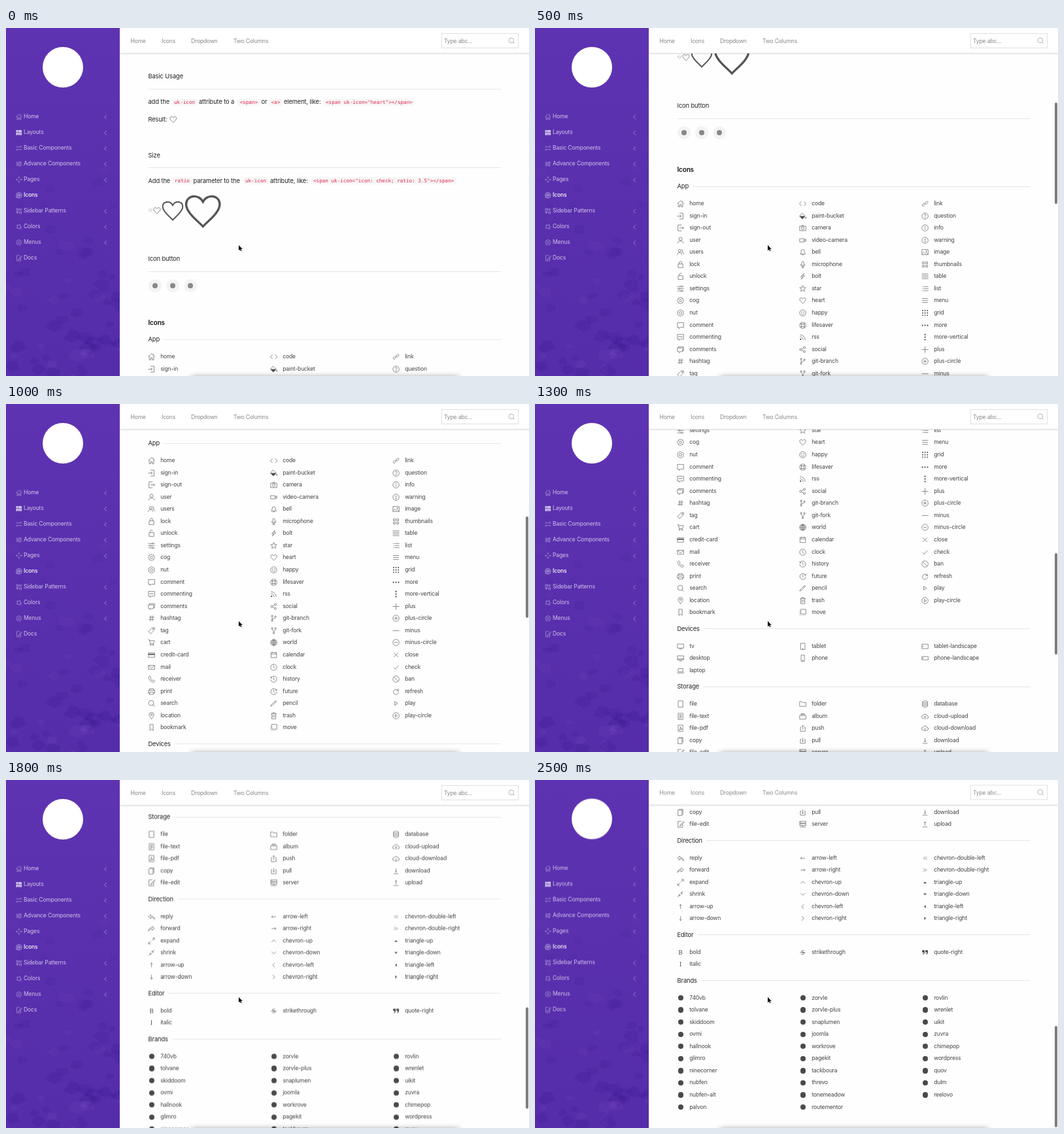
Write an HTML page that moves like this. It is 800x532 px and loops after 2.6 s.

```html
<!DOCTYPE html>
<html lang="en">
<head>
<meta charset="utf-8">
<title>Icons</title>
<style>
html, body { margin: 0; width: 100%; height: 100%; overflow: hidden; background: #fefefe; }
#stage { position: relative; width: 800px; height: 532px; overflow: hidden; background: #fefefe;
  font: 8.6px/12px Inter, "Liberation Sans", sans-serif; letter-spacing: -.02em; }
#stage div, #stage span, #stage svg { position: absolute; }
#page { inset: 0 0 -2px 0; }
#view { left: 0; top: 38px; width: 800px; height: 496px; overflow: hidden; }
#content { left: 0; top: -38px; width: 800px; height: 1600px; color: #444; }
#head { left: 174px; top: -2px; width: 626px; height: 39.5px; background: #fff; border-bottom: 1px solid #e2e2e2;
  box-shadow: 0 1px 2px rgba(0,0,0,.1); }
#side { left: 0; top: 0; width: 174px; height: 534px; overflow: hidden; background: linear-gradient(#5e33b2, #552ca9); }
#box { left: 666px; top: 8px; width: 116px; height: 21px; border: 1px solid #dfdfdf; background: #fff; }
#logo { left: 56px; top: 29px; width: 62px; height: 62px; border-radius: 50%; background: #fff; }
#thumb { left: 795px; top: 0; width: 4px; height: 155px; border-radius: 2px; background: #7d7d7d; }
#dock { left: 282px; top: 534px; width: 412px; height: 20px; border-radius: 6px; box-shadow: 0 0 9px 1px rgba(0,0,0,.4); }
.t { white-space: pre; margin-top: -6px; }
.nav { color: #888; }
.menu { color: #d0c2ea; }
.on { color: #fff; font-weight: 500; }
.p, .h { font-size: 9.4px; letter-spacing: -.015em; color: #222; }
.big { font-size: 10px; font-weight: 600; color: #111; }
.code { font: 7.62px/11px "DejaVu Sans Mono", monospace; letter-spacing: 0; color: #e3264f; background: #f7f6f6;
  padding: 0 3.3px; margin: -5.2px 0 0 -3.3px; border-radius: 1px; }
.rule { height: 1px; background: #e5e5e5; }
.h { left: 217.5px; width: 539px; display: flex; align-items: center; }
.h::after { content: ""; flex: 1; height: 1px; margin-left: 6px; background: #e5e5e5; }
.dot { border-radius: 50%; }
svg { overflow: visible; fill: none; stroke: currentColor; stroke-width: 1.1; }
svg .f { fill: currentColor; stroke: none; }
svg text { fill: currentColor; stroke: none; font: 17px "Liberation Serif", serif; text-anchor: middle; }
</style>
</head>
<body>
<div id="stage">
  <div id="page">
    <div id="view"><div id="content"></div></div>
    <div id="head"></div>
    <div id="top"><div id="box"></div></div>
    <div id="side"><svg id="rocks" width="174" height="534"></svg><div id="logo"></div></div>
  </div>
  <div id="thumb"></div>
  <div id="dock"></div>
  <svg style="left:356px;top:332px;stroke:none" width="8" height="11">
    <path d="M0 0v8.2l1.9-1.8 1.3 2.9 1.2-.6-1.2-2.8h2.6z" fill="#000" stroke="#fff" stroke-width=".7" paint-order="stroke"/>
  </svg>
</div>
<script>
const $ = id => document.getElementById(id);

// path helpers on a 20 x 20 grid
const c = (x, y, r) => `M${x - r} ${y}a${r} ${r} 0 1 0 ${2 * r} 0a${r} ${r} 0 1 0 ${-2 * r} 0`;
const b = (x, y, w, h) => `M${x} ${y}h${w}v${h}h${-w}z`;
const poly = (n, out, inn, turn = 0) => 'M' + Array.from({ length: 2 * n }, (_, i) => {
  const a = Math.PI * i / n - Math.PI / 2 + turn, r = i % 2 ? inn : out;
  return (10 + r * Math.cos(a)).toFixed(2) + ' ' + (10 + r * Math.sin(a)).toFixed(2);
}).join('L') + 'z';
const ring = c(10, 10, 8.5);
const dots = (...list) => '|' + list.map(([x, y]) => c(x, y, 1.3)).join('');
const cloud = 'M6.5 15.5H5a4 4 0 0 1-.5-8 6 6 0 0 1 11.3 1 3.5 3.5 0 0 1-.3 7h-2';
const sheet = b(3.5, 1.5, 13, 17);
const bubble = 'M6 18.7V15.5H1.5v-13h17v13H9.5z';

// stroke path | fill path, or =letter
const ICONS = {
  home: 'M1 10L10 1.5 19 10M4 8v10.500h4v-6h4v6h4V8M15 2v3',
  'sign-in': 'M7 2h10v16H7M1 10h11M8.5 6.5L12 10l-3.5 3.5',
  'sign-out': 'M13 2H3v16h10M7 10h11M15 6.5L18.5 10 15 13.5',
  user: c(10, 6, 4.4) + 'M2 18.5c0-4 3-6.5 8-6.5s8 2.5 8 6.5',
  users: c(7.5, 6.5, 3.5) + 'M1 17.5c0-4 2.5-6 6.5-6s6.5 2 6.5 6M11.5 3.5a3.4 3.4 0 1 1 2 6.5c3.5.3 5.5 2.5 5.5 5.5',
  lock: b(3.5, 8.5, 13, 10) + 'M6.5 8V5a3.5 3.5 0 0 1 7 0v3',
  unlock: b(3.5, 8.5, 13, 10) + 'M6.5 8V5a3.5 3.5 0 0 1 6.8-1.2',
  settings: 'M1 4h10M15 4h4M1 10h4M9 10h10M1 16h10M15 16h4' + c(13, 4, 2) + c(7, 10, 2) + c(13, 16, 2),
  cog: c(10, 10, 3.2) + poly(8, 9, 7.4),
  nut: c(10, 10, 3.5) + poly(3, 9, 9),
  comment: bubble,
  commenting: bubble + dots([6, 9], [10, 9], [14, 9]),
  comments: 'M6.5 19v-3.5H1.5v-10h14v10H9.8zM4 5.5v-3h14.5V13h-3',
  hashtag: 'M3.5 7h14M2.5 13h14M8.5 2.5L6 17.5M14 2.5L11.5 17.5',
  tag: 'M18.5 1.5l-.6 6L7.5 18.5l-6-6L12 2z' + c(14.5, 5.5, 1.2),
  cart: 'M1 2h2.6l3 11h8.6l3-8H4.6' + c(7.5, 16.5, 1.7) + c(14.5, 16.5, 1.7),
  'credit-card': b(1.5, 4.5, 17, 12) + '|' + b(1.5, 7, 17, 3),
  mail: b(1.5, 4.5, 17, 11) + 'M1.5 5.5l8.5 6.500 8.5-6.500',
  receiver: 'M6 1.5c-3 1-5 2.5-4 5.5 2 6 6 10 12 11.5 2.5.5 4-1.5 4.5-3.5l-4-3-2.5 2c-2.5-1-4-3-5-5l2-2z',
  print: 'M4.5 7V2.5h11V7M4.5 14.5h-3v-8h17v8h-3' + b(4.5, 11.5, 11, 6),
  search: c(9, 9, 7) + 'M14 14l4.5 4.5',
  location: 'M10 19C6 13 3.5 10 3.5 7.2a6.5 6.3 0 0 1 13 0C16.5 10 14 13 10 19z' + c(10, 7, 2.3),
  bookmark: 'M5.5 1.5h9v17L10 14l-4.5 4.5z',
  code: 'M6 4L1 10l5 6M14 4l5 6-5 6',
  'paint-bucket': 'M8 1.5l9 9L9 18l-8-7.5z|M1 10h16l-8 8zM18.5 12c-1.500 2-2 3.500-.8 4.500 1 .7 2.200 0 2.200-1.200 0-1-.8-2-1.400-3.300z',
  camera: b(1.5, 5.5, 17, 12) + 'M7 5.500l1-2.500h4l1 2.500' + c(10, 11, 3.7),
  'video-camera': b(1.5, 5.5, 12, 9) + 'M13.5 9l5-2.500v7l-5-2.500',
  bell: 'M3 15.5c2-2 2.5-4 2.5-7a4.5 5.500 0 0 1 9 0c0 3 .5 5 2.5 7zM8 16a2 2 0 0 0 4 0',
  microphone: 'M7 5a3 3 0 0 1 6 0v5a3 3 0 0 1-6 0zM4.5 9v1.5a5.5 5 0 0 0 11 0V9M10 15.500v3M6.500 18.500h7',
  bolt: 'M13 2L4.5 11h5L6 18l9.500-9.500h-5.200z',
  star: poly(5, 9, 4),
  heart: 'M10 18C7.8 15.5 1.5 11 1.5 6.8 1.5 2.2 7.6 1.2 10 5.5c2.4-4.3 8.5-3.3 8.5 1.3C18.5 11 12.200 15.500 10 18z',
  happy: ring + 'M5.500 12q4.500 5 9 0' + dots([7, 7.5], [13, 7.5]),
  lifesaver: ring + c(10, 10, 4.2) + 'M3 5l4 3M5 3l3 4M17 5l-4 3M15 3l-3 4M3 15l4-3M5 17l3-4M17 15l-4-3M15 17l-3-4',
  rss: 'M2 3.500A14.500 14.500 0 0 1 16.500 18M2 9a9 9 0 0 1 9 9|' + c(4, 16, 2),
  social: c(4, 10, 2.7) + c(14.5, 4.5, 2.7) + c(14.5, 15.5, 2.7) + 'M6.500 8.700l5.500-3M6.500 11.300l5.500 3',
  'git-branch': c(5.5, 3.5, 2) + c(5.5, 16.5, 2) + c(14.5, 5.5, 2) + 'M5.500 5.500v9M14.500 7.500c0 4-9 2-9 6.500',
  'git-fork': c(5.5, 3.5, 2) + c(14.5, 3.5, 2) + c(10, 16.5, 2) + 'M5.500 5.500c0 5 4.500 3 4.500 9 0-6 4.500-4 4.500-9',
  world: ring + 'M1.500 10h17M10 1.500v17M10 1.500c-5.500 5-5.500 12 0 17 5.500-5 5.500-12 0-17M3 5.500h14M3 14.500h14',
  calendar: b(2.5, 3.5, 15, 14) + 'M2.500 7.500h15M6 2v3M14 2v3',
  clock: ring + 'M10 4.500v6l3.500 3.500',
  history: 'M2 3v4h4M2.300 7a8.200 8.200 0 1 1-.6 4M10 5v5.500l3 3',
  future: 'M18 3v4h-4M17.700 7a8.200 8.200 0 1 0 .6 4M10 5v5.500l3 3',
  pencil: 'M17.500 4.500L6 16l-4.500 2 2-4.500L15.500 2.500zM13 5l2 2',
  trash: 'M2.500 4h15M7.500 4V1.500h5V4M4.500 4v14.500h11V4M8 7v8M12 7v8',
  move: b(4.5, 1.5, 14, 13) + 'M1.500 5v1.500M1.500 9v1.500M1.500 13v1.500M1.500 18h1.500M6 18h1.500M10 18h1.500M14 18h1.500',
  link: 'M10.500 7l3-3a2.400 2.400 0 0 1 3.500 3.500L13.500 11a2.400 2.400 0 0 1-3.400 0M9.500 13l-3 3A2.400 2.400 0 0 1 3 12.500L6.500 9a2.400 2.400 0 0 1 3.400 0M7.500 12.500l5-5',
  question: ring + 'M7.500 7.500a2.500 2.500 0 1 1 3.500 2.300q-1 .5-1 2' + dots([10, 14.5]),
  info: ring + 'M10 9v5.500' + dots([10, 6]),
  warning: ring + 'M10 5v6.500' + dots([10, 14]),
  image: b(1.5, 3, 17, 14) + 'M1.500 15l5-5 4 4 3-2.500 5 4' + c(13.5, 7.5, 1.3),
  thumbnails: b(3, 3, 5, 5) + b(12, 3, 5, 5) + b(3, 12, 5, 5) + b(12, 12, 5, 5),
  table: 'M1 3.500h18M1 7.800h18M1 12.100h18M1 16.500h18',
  list: 'M6 4.500h13M6 10h13M6 15.500h13M2 4.500h2M2 10h2M2 15.500h2',
  menu: 'M2 4.500h16M2 10h16M2 15.500h16',
  grid: '|' + [2, 8.5, 15].map(x => [2, 8.5, 15].map(y => b(x, y, 3, 3)).join('')).join(''),
  more: '|' + [3, 10, 17].map(x => c(x, 10, 2)).join(''),
  'more-vertical': '|' + [3, 10, 17].map(y => c(10, y, 2)).join(''),
  plus: 'M10 1v18M1 10h18',
  'plus-circle': ring + 'M10 5.500v9M5.500 10h9',
  minus: 'M1 10h18',
  'minus-circle': ring + 'M5.500 10h9',
  close: 'M4 4l12 12M16 4L4 16',
  check: 'M4 10.500l4 4.500 9-10',
  ban: ring + 'M4 4l12 12',
  refresh: 'M16 7.500A7 7 0 1 0 17 11.500M16.500 2.500v5.500h-5',
  play: 'M6.500 5l8 5-8 5z',
  'play-circle': ring + 'M8 6.500l5.500 3.500L8 13.500z',
  tv: b(1.5, 3.5, 17, 11) + 'M6 17h8',
  desktop: b(1.5, 3.5, 17, 11) + 'M6 17.500h8M1.500 12h17',
  laptop: b(3.5, 4.5, 13, 9) + 'M0 16.500h20',
  tablet: b(4, 1.5, 12, 17) + dots([10, 16]),
  phone: b(5.5, 1.5, 9, 17) + dots([10, 16]),
  'tablet-landscape': b(1.5, 4, 17, 12) + dots([4, 10]),
  'phone-landscape': b(1.5, 5.5, 17, 9) + dots([4, 10]),
  file: sheet,
  'file-text': sheet + 'M6.500 6h7M6.500 9h7M6.500 12h7M6.500 15h4',
  'file-pdf': sheet + 'M6 15c4-4 5-8 3.500-9-1.500 1 2 6 5 6.500-2 0-6 1-8.500 2.500',
  copy: b(3, 3.5, 11, 15) + 'M5.500 1.500h11v15',
  'file-edit': 'M12 2H3v16.500h13V10M18.500 2.500L9.500 11.500 8 15l3.500-1.500L19.500 4.500z',
  folder: 'M1.500 16.500v-13h6l2 2.500h9v10.500z',
  album: b(1.5, 7.5, 17, 10) + 'M3 5h14M5 2.500h10',
  push: 'M6 7.500H3.500v11h13v-11H14M10 14V2M7 5l3-3 3 3',
  pull: 'M6 6.500H3.500v11h13v-11H14M10 2v11M7 10l3 3 3-3',
  server: b(1.5, 2, 17, 5) + b(1.5, 8.5, 17, 5) + 'M10 13.500v4M2 17.500h16M4 4.500h2M4 11h2',
  database: 'M3 4a7 2.500 0 1 0 14 0a7 2.500 0 1 0-14 0v12a7 2.500 0 0 0 14 0V4M3 8a7 2.500 0 0 0 14 0M3 12a7 2.500 0 0 0 14 0',
  'cloud-upload': cloud + 'M10 18V9.500M7.500 12l2.500-2.500 2.500 2.500',
  'cloud-download': cloud + 'M10 9v9M7.500 15.500L10 18l2.500-2.500',
  download: 'M10 3v10M7 10.500l3 3 3-3M3.500 17.500h13',
  upload: 'M10 14V3.500M7 6.500l3-3 3 3M3.500 17.500h13',
  reply: 'M8 4L1.500 9.500 8 15v-3.500c5 0 8 1.500 10.500 5.500-1-6-4-9-10.500-9.500z',
  forward: 'M12 4l6.500 5.500L12 15v-3.500c-5 0-8 1.500-10.500 5.500 1-6 4-9 10.500-9.500z',
  expand: 'M12.500 2H18v5.500M18 2l-7 7M7.500 18H2v-5.500M2 18l7-7',
  shrink: 'M11.500 4v4.500H16M11.500 8.500L18 2M8.500 16v-4.500H4M8.500 11.500L2 18',
  'arrow-up': 'M10 4v12M6.500 7.500L10 4l3.500 3.500',
  'arrow-down': 'M10 4v12M6.500 12.500L10 16l3.500-3.500',
  'arrow-left': 'M4 10h12M7.500 6.500L4 10l3.500 3.500',
  'arrow-right': 'M4 10h12M12.500 6.500L16 10l-3.500 3.500',
  'chevron-up': 'M4 13l6-6 6 6',
  'chevron-down': 'M4 7l6 6 6-6',
  'chevron-left': 'M13 4l-6 6 6 6',
  'chevron-right': 'M7 4l6 6-6 6',
  'chevron-double-left': 'M10 6l-4 4 4 4M15 6l-4 4 4 4',
  'chevron-double-right': 'M10 6l4 4-4 4M5 6l4 4-4 4',
  'triangle-up': '|M5.500 12.500L10 8l4.500 4.500z',
  'triangle-down': '|M5.500 8l4.500 4.500L14.500 8z',
  'triangle-left': '|M12 5.500L7.500 10l4.500 4.500z',
  'triangle-right': '|M8 5.500l4.500 4.500L8 14.500z',
  bold: '=B', italic: '=I', strikethrough: '=S',
  'quote-right': '|M2 4h7v6c0 3-1.500 5-5 6v-2c2-.8 2.500-2 2.500-4H2zM11 4h7v6c0 3-1.500 5-5 6v-2c2-.8 2.500-2 2.500-4H11z',
  blocks: '|' + b(1, 2, 6, 7) + b(8, 2, 11, 7) + b(1, 10, 6, 8) + b(8, 10, 5, 8) + b(14, 10, 5, 8),
  swap: 'M1 6h18M15 2.500L19 6M1 14h18M5 17.500L1 14',
  nodes: 'M1 5h11M16 5h3M8 10h11M1 15h11M1 10h3' + c(14, 5, 2) + c(6, 10, 2) + c(14, 15, 2),
  cross: 'M10 1v6M10 13v6M1 10h6M13 10h6M7.500 3.500L10 1l2.500 2.500M7.500 16.500L10 19l2.500-2.500M3.500 7.500L1 10l2.500 2.500M16.500 7.500L19 10l-2.500 2.500',
  face: ring + c(10, 10, 4.5) + 'M2 18l2-3' + dots([8, 9.5], [12, 9.5]),
  pattern: b(2, 2, 6, 6) + b(12, 12, 6, 6) + c(15, 5, 3) + 'M2 12h6v3H2zM5 15v4M8 5h4',
  pin: poly(5, 8.5, 4.5, .4) + 'M13 13l5 5'
};

function icon(parent, name, x, y, size = 11.2, color = '#4a4a4a') {
  const spec = ICONS[name];
  const [line, fill] = spec.split('|');
  const body = spec[0] === '='
    ? `<text x="10" y="16"${name === 'italic' ? ' font-style="italic"' : ''}>${spec[1]}</text>` +
      (name === 'strikethrough' ? '<path d="M2 10.500h16"/>' : '')
    : `<path d="${line}"/>` + (fill ? `<path class="f" d="${fill}"/>` : '');
  parent.insertAdjacentHTML('beforeend', `<svg viewBox="0 0 20 20" width="${size}" height="${size}"
    style="left:${x - size / 2}px;top:${y - size / 2}px;color:${color}">${body}</svg>`);
}
function add(parent, tag, cls, style, text = '') {
  const e = parent.appendChild(document.createElement(tag));
  e.className = cls;
  e.textContent = text;
  for (const k in style) e.style[k] = style[k] + (typeof style[k] === 'number' ? 'px' : '');
  return e;
}
const text = (parent, cls, x, y, str) => add(parent, 'span', 't ' + cls, { left: x, top: y }, str);
const rule = y => add(content, 'div', 'rule', { left: 217.5, top: y, width: 539 });
const dot = (x, y, r, color) =>
  add(content, 'div', 'dot', { left: x - r, top: y - r, width: 2 * r, height: 2 * r, background: color });

// sidebar
const side = $('side'), content = $('content'), topBar = $('top');
let seed = 11;
const rnd = () => (seed = seed * 16807 % 2147483647) / 2147483647;
let rocks = '';
for (let i = 0; i < 60; i++) {
  const x = rnd() * 174, y = 130 + 400 * Math.sqrt(rnd()), r = 6 + rnd() * 9;
  const pts = [0, 1, 2, 3, 4].map(k => {
    const a = k * 1.257 + rnd() * .8;
    return `${(x + r * Math.cos(a)).toFixed(1)},${(y + r * .75 * Math.sin(a)).toFixed(1)}`;
  });
  const shade = i % 3 ? '50,18,140' : '124,80,196';
  rocks += `<polygon points="${pts.join(' ')}" stroke="none" fill="rgba(${shade},${(.05 + .13 * (y - 130) / 400).toFixed(3)})"/>`;
}
$('rocks').innerHTML = rocks;

[['Home', 'home', 1], ['Layouts', 'blocks', 1], ['Basic Components', 'swap', 1], ['Advance Components', 'nodes', 1],
 ['Pages', 'cross', 1], ['Icons', 'face', 0], ['Sidebar Patterns', 'pattern', 1], ['Colors', 'pin', 1],
 ['Menus', 'cog', 1], ['Docs', 'file-edit', 0]].forEach(([label, name, arrow], i) => {
  const y = 135.3 + 24 * i, on = label === 'Icons', color = on ? '#fff' : '#d0c2ea';
  icon(side, name, 20, y, 9.6, color);
  text(side, on ? 'on' : 'menu', 27, y, label);
  if (arrow) icon(side, 'chevron-left', 152.5, y + 1.3, 10.5, color);
});

// top bar
[['Home', 190.5], ['Icons', 238], ['Dropdown', 283], ['Two Columns', 348]].forEach(([s, x]) => text(topBar, 'nav', x, 19.5, s));
text(topBar, 'nav', 670, 19.8, 'Type abc...');
icon(topBar, 'search', 773, 19.5, 11, '#888');

// page text; odd runs are code
function runs(y, ...list) {
  list.forEach(([x, s], i) => text(content, i % 2 ? 'code' : 'p', x, y, s));
}
text(content, 'p', 217.5, 73.5, 'Basic Usage');
rule(92.5);
runs(113, [217.5, 'add the'], [257, 'uk-icon'], [295, 'attribute to a'], [357.5, '<span>'], [390.5, 'or'],
  [405.5, '<a>'], [425, 'element, like:'], [489, '<span uk-icon="heart"></span>']);
text(content, 'p', 217.5, 140, 'Result:');
icon(content, 'heart', 255.8, 139.8, 11.6);
text(content, 'p', 217.5, 194.5, 'Size');
rule(213);
runs(233.5, [217.5, 'Add the'], [258, 'ratio'], [286.5, 'parameter to the'], [366, 'uk-icon'],
  [404, 'attribute, like:'], [470, '<span uk-icon="icon: check; ratio: 3.5"></span>']);
[[220.5, 6], [230.5, 12], [254.7, 36], [301, 60.5]].forEach(([x, size]) => icon(content, 'heart', x, 278.8, size, '#555'));
text(content, 'p', 217.5, 353, 'Icon button');
rule(372);
[227.5, 254.7, 282].forEach(x => { dot(x, 393.5, 10, '#f3f3f3'); dot(x, 393.5, 4, '#888'); });
text(content, 'big', 217.5, 449.5, 'Icons');

const SECTIONS = {
  App: ['home sign-in sign-out user users lock unlock settings cog nut comment commenting comments hashtag tag cart credit-card mail receiver print search location bookmark',
    'code paint-bucket camera video-camera bell microphone bolt star heart happy lifesaver rss social git-branch git-fork world calendar clock history future pencil trash move',
    'link question info warning image thumbnails table list menu grid more more-vertical plus plus-circle minus minus-circle close check ban refresh play play-circle'],
  Devices: ['tv desktop laptop', 'tablet phone', 'tablet-landscape phone-landscape'],
  Storage: ['file file-text file-pdf copy file-edit', 'folder album push pull server', 'database cloud-upload cloud-download download upload'],
  Direction: ['reply forward expand shrink arrow-up arrow-down',
    'arrow-left arrow-right chevron-up chevron-down chevron-left chevron-right',
    'chevron-double-left chevron-double-right triangle-up triangle-down triangle-left triangle-right'],
  Editor: ['bold italic', 'strikethrough', 'quote-right'],
  Brands: ['740vb tolvane skiddoom ovmi hallnook glimro ninecorner nubfen nubfen-alt palvon',
    'zorvle zorvle-plus snaplumen joomla workrove pagekit tackboura threvo tonemeadow routementor',
    'rovlin wrenlet uikit zuvra chimepop wordpress quov dulm reelovo']
};
const ROW = 18.56;
let y = 476;
for (const [title, cols] of Object.entries(SECTIONS)) {
  add(content, 'div', 't h', { top: y }, title);
  cols.forEach((names, col) => names.split(' ').forEach((name, i) => {
    const x = 223 + 187 * col, cy = y + 26 + ROW * i;
    if (ICONS[name]) icon(content, name, x, cy + .6);
    else dot(x, cy + .5, 4.2, '#4a4a4a');
    text(content, '', x + 13.2, cy, name);
  }));
  y += cols[0].split(' ').length * ROW + 32.74;
}

// motion: scroll offset for every 100 ms
const LOOP = 2600, STEP = 100;
const SCROLL = [0, 7, 35, 83.5, 163, 234, 287, 325.5, 357, 383, 416, 461, 520, 592, 688, 782, 858, 919, 967.5, 1008, 1038, 1056.5];
const play = (e, frames) => e.animate(frames, { duration: LOOP, iterations: Infinity });
const stepped = fn => {
  const at = i => SCROLL[Math.min(i, SCROLL.length - 1)];
  return Array.from({ length: LOOP / STEP + 1 }, (_, i) =>
    ({ offset: i * STEP / LOOP, easing: 'step-end', ...fn(at(i), i) }));
};
play(content, stepped(s => ({ transform: `translateY(${-s}px)` })));
play($('thumb'), stepped((s, i) => ({ transform: `translateY(${39.4 + .3185 * s}px)`, opacity: i ? 1 : 0 })));
play($('page'), stepped((s, i) => ({ transform: `translateY(${i < 25 ? 0 : -.5}px)` })));
</script>
</body>
</html>
```
